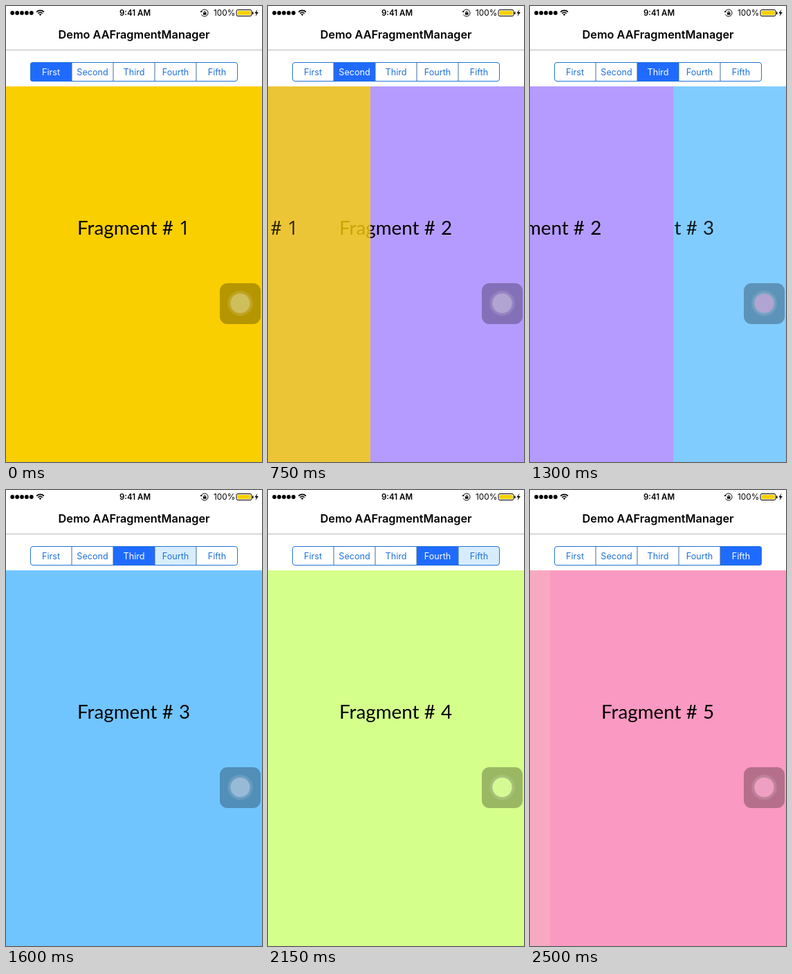
An HTML page with a canvas that plays this animation: 370 by 658 pixels, repeating every 2600 ms.

```html
<!DOCTYPE html>
<html lang="en">
<head>
<meta charset="utf-8">
<title>Fragment switcher</title>
<style>
html, body { margin: 0; width: 100%; height: 100%; overflow: hidden; background: #fff; }
canvas { display: block; width: 370px; height: 658px; }
</style>
</head>
<body>
<canvas id="stage"></canvas>
<script>
const W = 370, H = 658, LOOP = 2600, STEP = 50, SLIDE = 250;
const TOP = 116, SEG_X = 35, SEG_Y = 81, SEG_W = 60, SEG_H = 28;
const WHITE = [255, 255, 255], BLUE = [32, 107, 255], LABEL = [29, 113, 218], PRESSED = [215, 237, 253];

const pages = [
  { name: 'First', color: [250, 207, 0], knob: '#cfbe5c' },
  { name: 'Second', color: [181, 155, 255], knob: '#b1a4d3' },
  { name: 'Third', color: [112, 197, 255], knob: '#98bad6' },
  { name: 'Fourth', color: [213, 255, 139], knob: '#d4fa94' },
  { name: 'Fifth', color: [250, 153, 193], knob: '#ef9fc2' }
];
// Each tap highlights a segment, then starts the slide to the next page.
const taps = [
  { press: 500, slide: 600 },
  { press: 1050, slide: 1190 },
  { press: 1600, slide: 1750 },
  { press: 2150, slide: 2270 }
];

const canvas = document.getElementById('stage');
const ctx = canvas.getContext('2d');
const dpr = window.devicePixelRatio || 1;
canvas.width = W * dpr;
canvas.height = H * dpr;

const clamp = v => Math.max(0, Math.min(1, v));
const mix = (a, b, k) => a.map((v, i) => v + (b[i] - v) * k);
const rgb = c => `rgb(${c.map(Math.round).join(',')})`;

function text(str, x, y, font, color = '#000', align = 'left') {
  ctx.font = font;
  ctx.fillStyle = color;
  ctx.textAlign = align;
  ctx.fillText(str, x, y);
}

function disc(x, y, r, color) {
  ctx.fillStyle = color;
  ctx.beginPath();
  ctx.arc(x, y, r, 0, Math.PI * 2);
  ctx.fill();
}

function roundRect(x, y, w, h, r) {
  ctx.beginPath();
  ctx.roundRect(x, y, w, h, r);
}

function arc(x, y, r, from, to) {
  ctx.beginPath();
  ctx.arc(x, y, r, from * Math.PI, to * Math.PI);
  ctx.stroke();
}

function drawStatus() {
  for (let i = 0; i < 5; i++) disc(9.2 + i * 6.9, 10, 2.9, '#000');

  ctx.strokeStyle = '#000';
  ctx.lineWidth = 1.7;
  for (const r of [4.6, 7.6]) arc(49.5, 14, r, 1.25, 1.75);
  ctx.fillStyle = '#000';
  ctx.beginPath();
  ctx.moveTo(49.5, 14);
  ctx.arc(49.5, 14, 2.6, 1.25 * Math.PI, 1.75 * Math.PI);
  ctx.fill();

  text('9:41 AM', 186.5, 14, '600 11.5px Inter, sans-serif', '#000', 'center');

  ctx.lineWidth = 1;
  arc(287, 10, 5, -0.85, 0.85);
  ctx.fillRect(285, 9.5, 4.5, 3.2);
  arc(287.2, 9.4, 1.5, 1, 2);
  ctx.beginPath();
  ctx.moveTo(280.5, 9);
  ctx.lineTo(284, 9);
  ctx.lineTo(282.2, 6.5);
  ctx.fill();

  text('100%', 300, 14, '400 11.8px Inter, sans-serif');
  roundRect(333, 5.5, 22, 9, 2);
  ctx.stroke();
  ctx.fillStyle = '#facf00';
  ctx.fillRect(334.5, 7, 19, 6);
  ctx.fillStyle = '#000';
  ctx.fillRect(356, 8.5, 1.5, 3.5);
  ctx.beginPath();
  for (const [x, y] of [[363.5, 5], [359.3, 10.6], [361.8, 10.6], [360.6, 15], [364.8, 9], [362.2, 9]]) ctx.lineTo(x, y);
  ctx.fill();
}

function drawHeader() {
  drawStatus();
  text('Demo AAFragmentManager', 185, 47.3, '600 16.3px Inter, sans-serif', '#000', 'center');
  ctx.fillStyle = '#b9b9b9';
  ctx.fillRect(0, 63, W, 1);
}

function drawSegments(t) {
  const look = pages.map((_, i) => ({ fill: i ? WHITE : BLUE, label: i ? LABEL : WHITE }));
  taps.forEach(({ press, slide }, i) => {
    if (t < press) return;
    const k = clamp((t - slide + 90) / 180);
    look[i] = { fill: mix(BLUE, WHITE, k), label: mix(WHITE, LABEL, k) };
    look[i + 1] = { fill: mix(PRESSED, BLUE, k), label: mix(LABEL, WHITE, k) };
  });

  ctx.save();
  roundRect(SEG_X, SEG_Y, SEG_W * 5, SEG_H, 4);
  ctx.clip();
  look.forEach((s, i) => {
    ctx.fillStyle = rgb(s.fill);
    ctx.fillRect(SEG_X + i * SEG_W, SEG_Y, SEG_W, SEG_H);
  });
  ctx.restore();

  ctx.fillStyle = '#3f6f9f';
  for (let i = 1; i < 5; i++) ctx.fillRect(SEG_X + i * SEG_W - 0.5, SEG_Y, 1, SEG_H);
  ctx.strokeStyle = '#2272d8';
  ctx.lineWidth = 1;
  roundRect(SEG_X + 0.5, SEG_Y + 0.5, SEG_W * 5 - 1, SEG_H - 1, 3.5);
  ctx.stroke();
  look.forEach((s, i) => text(pages[i].name, SEG_X + (i + 0.5) * SEG_W, 99.7,
    '400 12.6px Inter, sans-serif', rgb(s.label), 'center'));
}

function drawPage(i, x, alpha, color = pages[i].color) {
  ctx.save();
  ctx.globalAlpha = alpha;
  ctx.translate(x, 0);
  ctx.fillStyle = rgb(color);
  ctx.fillRect(0, TOP, W, H - TOP);
  const font = '400 27.8px Lato, sans-serif';
  text('Fragment', 103, 330, font);
  text('#', 233.7, 330, font, '#000', 'center');
  text(i + 1, 258, 330, i ? font : '400 28px "Open Sans", sans-serif', '#000', 'center');
  ctx.restore();
}

function drawButton(page) {
  ctx.fillStyle = 'rgba(0,0,0,.28)';
  roundRect(309, 400, 59, 59, 11);
  ctx.fill();
  disc(338.5, 429, 18.5, 'rgba(255,255,255,.1)');
  disc(338.5, 429, 16, 'rgba(255,255,255,.06)');
  disc(338.5, 429, 14, page.knob);
}

function draw(t) {
  ctx.setTransform(dpr, 0, 0, dpr, 0, 0);
  ctx.fillStyle = '#fff';
  ctx.fillRect(0, 0, W, H);
  drawHeader();
  drawSegments(t);

  const done = taps.filter(tap => t >= tap.slide + SLIDE).length;
  const p = done < taps.length ? clamp((t - taps[done].slide) / SLIDE) : 0;
  if (p > 0) {
    // The next page fades in first, then the leaving one fades out.
    drawPage(done + 1, 0, Math.min(1, 2 * p));
    drawPage(done, -W * p, Math.min(1, 2 * (1 - p)), mix(pages[done].color, WHITE, p ** 8));
  } else {
    drawPage(done, 0, 1);
  }
  drawButton(pages[p >= 0.5 ? done + 1 : done]);
}

const start = performance.now();
function tick() {
  const t = (performance.now() - start) % LOOP;
  draw(Math.min(2500, Math.floor(t / STEP) * STEP));
  requestAnimationFrame(tick);
}
tick();
</script>
</body>
</html>
```
